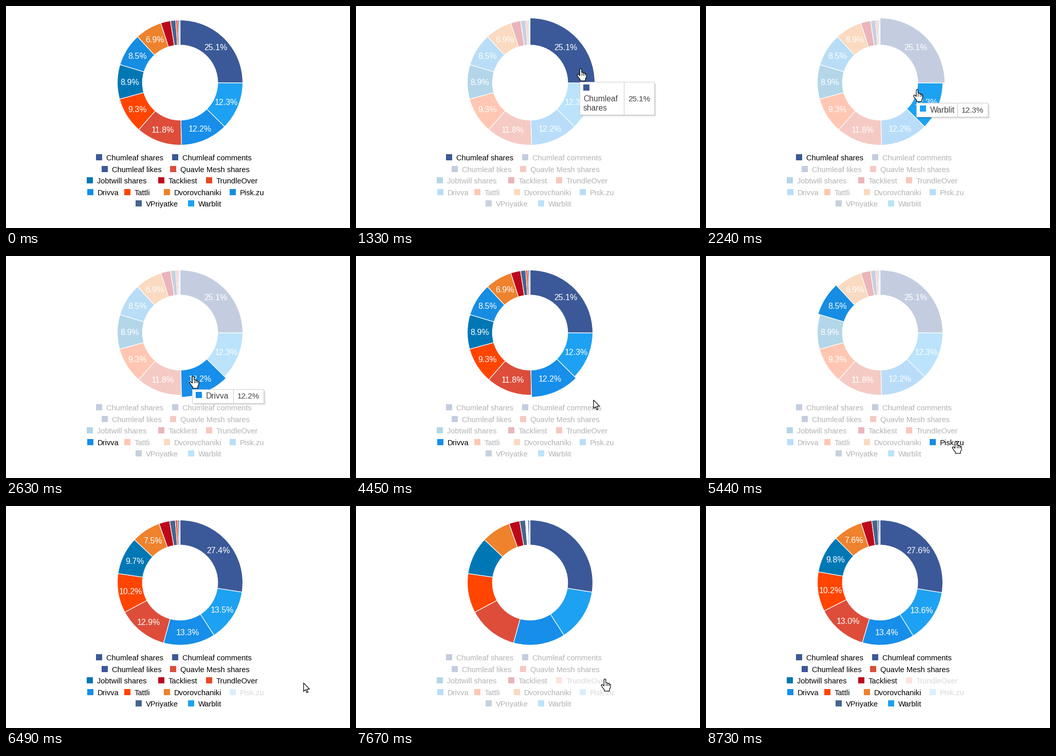
Animation, 669 px wide and 433 px high, one loop 9850 ms. Source, as a matplotlib script:

```python
import math
import numpy as np
import matplotlib.pyplot as plt
from matplotlib.animation import FuncAnimation
from matplotlib.colors import to_rgb
from matplotlib.patches import Polygon, Rectangle, Wedge

W, H, DPI = 669, 433, 64
PX = 72 / DPI                      # points per pixel
INTERVAL, FRAMES = 50, 197
CX, CY, OUTER, INNER, BUMP = 338.5, 149.4, 122, 73.2, 4
FADED, DISABLED = 0.3, 0.15
LAG = 80                           # the legend reacts later than the pie
MORPH = 500                        # ms for a slice to close
ROWS = [295.5, 318.5, 340.5, 363.5, 385.5]

# name, colour, share, legend x, legend row (in pie order)
SERIES = [
    ("Chumleaf shares", "#3b5998", 25.1, 175, 0),
    ("Warblit", "#1da1f2", 12.34, 354, 4),
    ("Drivva", "#168eea", 12.2, 158, 3),
    ("Quavle Mesh shares", "#dd4d3a", 11.8, 319, 1),
    ("Tattli", "#ff4500", 9.3, 230, 3),
    ("Jobtwill shares", "#0077b5", 8.9, 157, 2),
    ("Pisk.zu", "#168de2", 8.5, 435, 3),
    ("Dvorovchaniki", "#ee822d", 6.9, 307, 3),
    ("Tackliest", "#bd081c", 2.52, 296, 2),
    ("VPriyatke", "#45668e", 1.36, 252, 4),
    ("TrundleOver", "#eb4924", 0.52, 389, 2),
    ("Chumleaf comments", "#3b5998", 0.36, 323, 0),
    ("Chumleaf likes", "#3b5998", 0.2, 186, 1),
]
CLICKS = {6: 5990, 10: 7670}       # slice index -> time it is switched off

# time, x, y of the pointer tip
PATH = np.array([
    (840, 613, 250), (1240, 437, 122.5), (2070, 437, 122.5), (2540, 364, 234.5),
    (4370, 364, 234.5), (4490, 462, 281), (4700, 578, 336), (5010, 578, 336),
    (5350, 486, 361.5), (6300, 486, 361.5), (6550, 608, 340), (6950, 500, 338),
    (7100, 484, 337.5), (8200, 484, 337.5), (8550, 640, 403), (8650, 630, 403),
    (8690, 630, 420), (8720, 630, 440),
])
SHOW_FROM, SHOW_TO = 840, 8730

HAND = [(-1.7, 1.2), (-0.7, 0), (0.8, 0), (1.8, 1.2), (1.8, 7), (4.4, 7.2),
        (5.2, 8.3), (7.6, 8.5), (8.4, 9.6), (10, 9.8), (11, 11), (11, 16),
        (9, 20), (9, 23.5), (-1, 23.5), (-1, 21), (-4.5, 16.5), (-7, 12.5),
        (-6.3, 10.8), (-4.5, 10.8), (-1.7, 13.5)]
ARROW = [(0, 0), (0, 16.5), (3.8, 13), (6.3, 19), (8.7, 18), (6.2, 12.2), (11.6, 12)]

fig = plt.figure(figsize=(W / DPI, H / DPI), dpi=DPI, facecolor="white")
ax = fig.add_axes([0, 0, 1, 1])
ax.set(xlim=(0, W), ylim=(H, 0))
ax.axis("off")
live = []


def tint(color, strength):
    return tuple(1 - strength * (1 - c) for c in to_rgb(color))


def patch(shape):
    live.append(ax.add_patch(shape))


def box(x, y, w, h, color, z=1, **style):
    patch(Rectangle((x, y), w, h, fc=color, zorder=z, **{"lw": 0, **style}))


def line(xs, ys, color, z, **style):
    live.extend(ax.plot(xs, ys, color=color, lw=PX, zorder=z, **style))


def text(x, y, s, size, color, z=3, **style):
    live.append(ax.text(x, y, s, fontsize=size * PX, color=color, zorder=z,
                        family="Liberation Sans", **style))


def progress(index, t):
    """Eased 0..1 closing of a slice that gets switched off."""
    if index not in CLICKS:
        return 0
    u = min(max((t - CLICKS[index]) / MORPH, 0), 1)
    return u * u * (3 - 2 * u)


def is_off(index, t):
    return index in CLICKS and t >= CLICKS[index]


def slices(t):
    """Start and end of every slice as fractions of the ring."""
    sizes = np.array([s[2] * (1 - progress(i, t)) for i, s in enumerate(SERIES)])
    ends = np.cumsum(sizes) / sizes.sum()
    return np.concatenate([[0], ends[:-1]]), ends


def pointer(t):
    return np.interp(t, PATH[:, 0], PATH[:, 1]), np.interp(t, PATH[:, 0], PATH[:, 2])


def hit(t):
    """Index under the pointer and whether it was found in the ring."""
    if not SHOW_FROM <= t < SHOW_TO:
        return None, False
    x, y = pointer(t)
    if INNER <= math.hypot(x - CX, y - CY) <= OUTER:
        turn = math.atan2(x - CX, CY - y) / (2 * math.pi) % 1
        return min(int(np.searchsorted(slices(t)[1], turn)), len(SERIES) - 1), True
    for i, (name, _, _, left, row) in enumerate(SERIES):
        if left <= x <= left + 20 + 8 * len(name) and abs(y - ROWS[row]) <= 9:
            return i, False
    return None, False


def draw_pie(t, focus, raised):
    moving = any(0 <= t - click < MORPH for click in CLICKS.values())
    if focus is not None and is_off(focus, t):
        focus = None
    for i, (start, end) in enumerate(zip(*slices(t))):
        if end - start < 1e-6:
            continue
        radius = OUTER + BUMP * (i == raised and not is_off(i, t))
        strength = 1 if focus in (None, i) else FADED
        color = "white" if is_off(i, t) else tint(SERIES[i][1], strength)
        patch(Wedge((CX, CY), radius, 360 * start - 90, 360 * end - 90,
                    width=radius - INNER, fc=color, ec="white", lw=1.2 * PX,
                    zorder=1.5 if i == raised else 1))
        if end - start > 0.05 and not moving:
            a, r = math.pi * (start + end), (OUTER + INNER) / 2
            text(CX + r * math.sin(a), CY - r * math.cos(a) + 5.8,
                 f"{100 * (end - start):.1f}%", 16, "white", ha="center")


def draw_legend(t, focus):
    for i, (name, color, _, x, row) in enumerate(SERIES):
        strength = 1 if focus in (None, i) else FADED
        if is_off(i, t):
            strength = DISABLED
        y = ROWS[row]
        box(x, round(y - 6.5), 12, 12, tint(color, strength))
        text(x + 20, y + 5.5, name, 14.67, tint("black", strength))


def draw_tooltip(t, index):
    x, y = pointer(t)
    x, y = round(x - 2.6) + 0.5, round(y + 24.5) + 0.5
    name, color = SERIES[index][:2]
    start, end = (edge[index] for edge in slices(t))
    wrapped = index == 0
    w, h, split = (145, 64, 86) if wrapped else (139, 27, 80)
    for k in range(1, 5):
        box(x + k, y + k, w, h, "black", 5, alpha=0.05)
    box(x, y, w, h, "white", 6, ec="#cccccc", lw=PX)
    box(x + 7.5, y + 5.5, 12, 12, color, 7)
    line([x + split] * 2, [y + 1, y + h], "#999999", 7, linestyle=(0, (1, 1)))
    base = y + (38 if wrapped else 19)
    lines = name.split() if wrapped else [name]
    for k, word in enumerate(lines):
        text(x + (7.5 if wrapped else 27.5), base + 18 * k, word, 15.6, "#444444", 7)
    text(x + split + 8.5, base, f"{100 * (end - start):.1f}%", 15.3, "#444444", 7)


def draw_pointer(t, over):
    x, y = pointer(t)
    shape = np.array(HAND if over else ARROW) + (x, y)
    patch(Polygon(shape, fc="white", ec="black", lw=1.2 * PX, zorder=10, joinstyle="round"))
    if over:
        for dx in (1.8, 5, 8.2):
            line([x + dx] * 2, [y + 8, y + 12.5], "black", 11)


def draw(frame):
    t = frame * INTERVAL + 40
    while live:
        live.pop().remove()
    focus, in_ring = hit(t)
    late_focus = hit(t - LAG)[0]
    draw_pie(t, focus, late_focus)
    draw_legend(t, late_focus)
    if in_ring:
        draw_tooltip(t, focus)
    if SHOW_FROM <= t < SHOW_TO:
        draw_pointer(t, focus is not None)
    return live


anim = FuncAnimation(fig, draw, frames=FRAMES, interval=INTERVAL,
                     init_func=lambda: draw(0), repeat=True, repeat_delay=0, blit=False)
plt.show()
```
